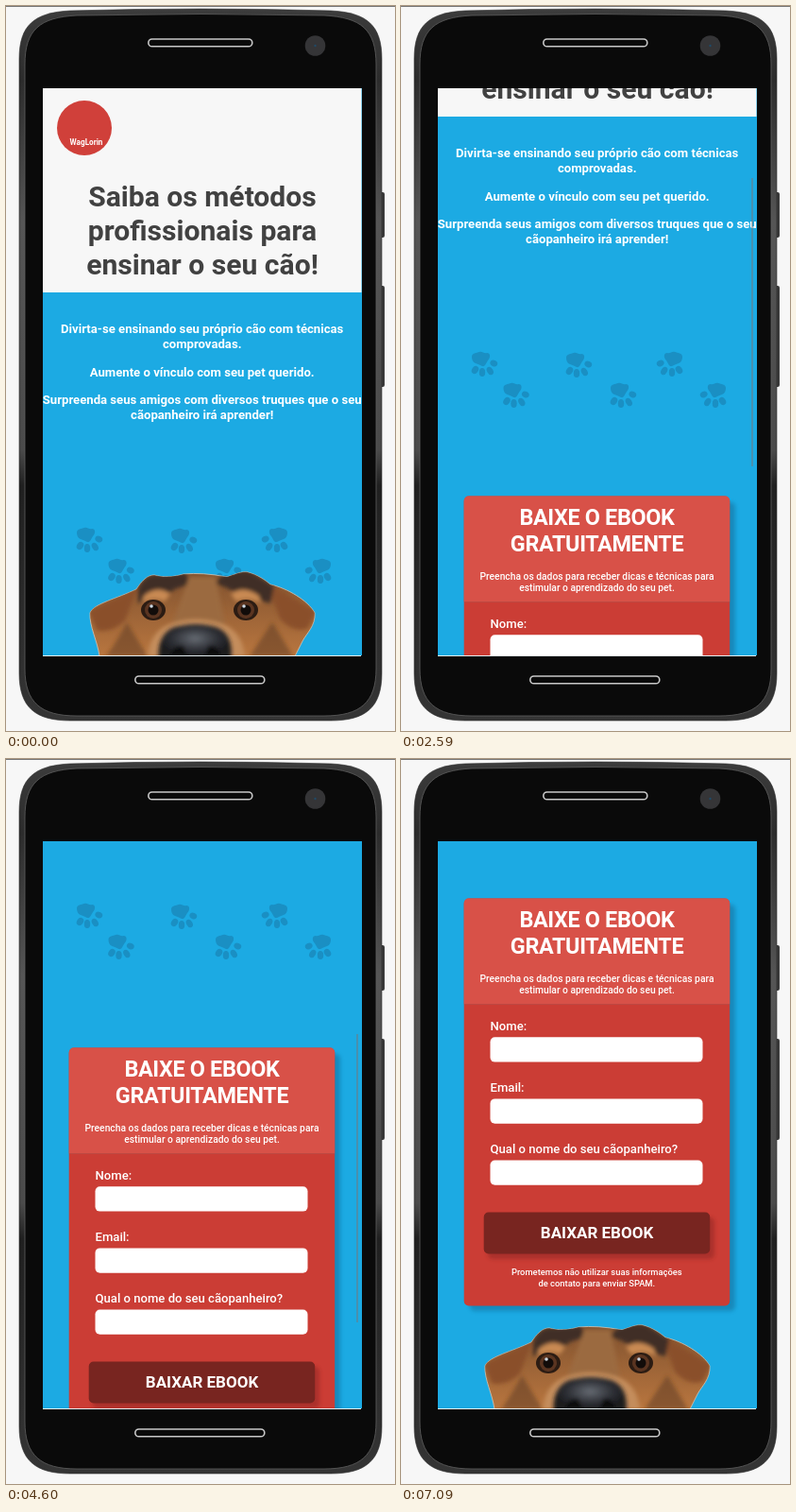
Animation, 412 px wide and 767 px high, one loop 8000 ms. Source, as an HTML page:

```html
<!DOCTYPE html>
<html lang="pt">
<head>
<meta charset="utf-8">
<title>Landing page</title>
<style>
html, body { margin: 0; width: 100%; height: 100%; overflow: hidden; background: #f7f7f7; }
svg { display: block; width: 100%; height: 100%; }
text { font-family: Roboto, Arial, sans-serif; fill: #fff; }
.mid text { text-anchor: middle; }
.title text { font-size: 30.1px; font-weight: 700; fill: #414141; }
.lead text { font-size: 13.15px; font-weight: 700; }
.head text { font-size: 23.4px; font-weight: 700; letter-spacing: -.35px; }
.intro text { font-size: 10.28px; font-weight: 500; }
.label text { font-size: 13.1px; font-weight: 500; }
.note text { font-size: 9.38px; font-weight: 500; }
</style>
</head>
<body>
<svg viewBox="0 0 412 767">
  <defs>
    <clipPath id="screen"><rect x="39" y="87" width="338" height="600"/></clipPath>
    <clipPath id="skull"><use href="#head"/></clipPath>
    <filter id="soft" x="-10%" y="-10%" width="120%" height="120%"><feGaussianBlur stdDeviation="2"/></filter>
    <linearGradient id="rim" x2="0" y2="1">
      <stop offset="0" stop-color="#3c3c3c"/><stop offset=".1" stop-color="#2c2c2c"/>
      <stop offset=".3" stop-color="#555"/><stop offset=".62" stop-color="#4a4a4a"/>
      <stop offset=".67" stop-color="#202020"/><stop offset="1" stop-color="#353535"/>
    </linearGradient>
    <linearGradient id="fur" x2="0" y2="1">
      <stop offset="0" stop-color="#80522f"/><stop offset="1" stop-color="#b9763f"/>
    </linearGradient>
    <radialGradient id="nose" cy=".4">
      <stop offset="0" stop-color="#666b73"/><stop offset=".6" stop-color="#303238"/>
      <stop offset="1" stop-color="#1a1a1d"/>
    </radialGradient>
    <path id="head" d="M99 688C97 672 88 656 89 642C93 632 118 627 138 617C144 608 150 602 157 602C167 605 178 604 188 601Q208 599 234 604C244 601 249 598 256 599C267 602 274 607 280 612C298 616 320 629 327 642C328 656 318 664 314 672L306 688Z"/>
    <g id="paw" fill="#1a8fc3">
      <path d="M-13-7C-13-11-8-11-5-12C-2-13 0-10 3-11C7-11 7-6 4-3C2 0 1 4-2 3C-4 2-6 1-9 0C-12-1-13-4-13-7Z"/>
      <ellipse cx="-9.5" cy="7" rx="3.3" ry="4.4" transform="rotate(35 -9.5 7)"/>
      <ellipse cx="-2" cy="9.5" rx="3.2" ry="4.5"/>
      <ellipse cx="6.3" cy="8" rx="3.2" ry="4.5" transform="rotate(-30 6.3 8)"/>
      <ellipse cx="10.3" cy="0" rx="4" ry="3.2" transform="rotate(25 10.3 0)"/>
    </g>
    <g id="eye">
      <ellipse rx="13" ry="11" fill="#2c1c13"/>
      <circle r="9" fill="#5b3521"/>
      <circle r="5.5" fill="#120c0a"/>
      <circle cx="-2" cy="-4" r="1.8" fill="#cdd8e2"/>
    </g>
  </defs>

  <rect width="412" height="767" fill="#f7f7f7"/>
  <path d="M0 .5H412" stroke="#777"/>

  <!-- phone -->
  <rect x="395" y="197" width="6" height="48" rx="2" fill="#3a3a3a"/>
  <rect x="395" y="296" width="6" height="107" rx="2" fill="#3a3a3a"/>
  <path fill="url(#rim)" stroke="#2a2a2a" stroke-width=".6" d="M14 56C14 20 30 7 68 5Q206 1 344 5C382 7 398 20 398 56V706C398 742 381 756 344 756H68C31 756 14 742 14 706Z"/>
  <path fill="#0a0a0a" stroke="#606060" stroke-width=".8" d="M20 62C20 25 36 12 75 10Q206 7 337 10C376 12 392 25 392 62V701C392 737 375 751 337 751H75C37 751 20 737 20 701Z"/>
  <g fill="#0a0a0a" stroke="#c8c8c8" stroke-width="1.6">
    <rect x="150.8" y="35" width="110" height="7.8" rx="3.9"/>
    <rect x="136.8" y="709" width="137" height="7.8" rx="3.9"/>
  </g>
  <circle cx="327.5" cy="42" r="10.8" fill="#353537"/>
  <circle cx="327.5" cy="42" r="1.2" fill="#204a68"/>
  <path d="M39 687.5H376" stroke="#e4eef2"/>

  <g clip-path="url(#screen)">
    <rect x="39" y="87" width="338" height="600" fill="#1caae3"/>

    <g class="scroll mid">
      <rect x="39" y="87" width="337.5" height="216" fill="#f7f7f7"/>
      <circle cx="83" cy="129" r="29" fill="#d0403a"/>
      <text x="85" y="146.5" font-size="8.2" font-weight="700">WagLorin</text>
      <g class="title">
        <text x="208" y="211.5">Saiba os métodos</text>
        <text x="208" y="247.5">profissionais para</text>
        <text x="208" y="283.5">ensinar o seu cão!</text>
      </g>
      <g class="lead">
        <text x="207.7" y="346">Divirta-se ensinando seu próprio cão com técnicas</text>
        <text x="207.7" y="362">comprovadas.</text>
        <text x="207.7" y="391.5">Aumente o vínculo com seu pet querido.</text>
        <text x="207.7" y="421">Surpreenda seus amigos com diversos truques que o seu</text>
        <text x="207.7" y="437">cãopanheiro irá aprender!</text>
      </g>
      <use href="#paw" x="88" y="564"/>
      <use href="#paw" x="121.5" y="597"/>
      <use href="#paw" x="188" y="565"/>
      <use href="#paw" x="235" y="597"/>
      <use href="#paw" transform="translate(285 564) scale(-1 1)"/>
      <use href="#paw" transform="translate(331 597) scale(-1 1)"/>
    </g>

    <!-- dog, fixed to the bottom edge -->
    <use href="#head" fill="url(#fur)" stroke="#d9c6b3" stroke-width=".8"/>
    <g clip-path="url(#skull)">
      <g filter="url(#soft)">
        <path fill="#8a4f2a" d="M88 640L139 616Q132 634 126 650Q112 664 96 660ZM328 640L274 609Q284 630 290 648Q304 664 320 658Z"/>
        <path fill="#3f2e25" d="M140 616Q148 600 160 602L190 600L198 612Q180 614 172 622L140 632ZM230 602Q246 596 260 599L284 614L280 632L244 622Q234 614 220 611Z"/>
        <path fill="#c98a52" d="M146 624Q160 612 174 622L168 630Q156 624 144 632ZM238 622Q252 612 268 624L270 632Q256 624 244 630Z"/>
        <path fill="#9b6a41" d="M194 604H222L232 654H176Z"/>
        <path fill="#5b3a27" d="M106 688Q120 668 128 652L150 688ZM304 688Q292 668 282 652L258 688Z" opacity=".5"/>
        <path fill="#c48d5c" d="M150 688Q153 660 176 653Q201 645 227 653Q250 660 253 688Z"/>
      </g>
      <use href="#eye" x="156" y="639"/>
      <use href="#eye" x="254" y="639"/>
      <g filter="url(#soft)">
        <path fill="url(#nose)" d="M162 692C160 672 168 658 184 656Q201 652 218 656C234 659 241 672 238 692Z"/>
        <path fill="#0c0c0e" d="M174 690Q176 675 188 677L193 690ZM210 690L214 677Q226 675 227 690Z"/>
      </g>
    </g>

    <g class="scroll">
      <rect x="73" y="711" width="281" height="430" rx="5" fill="#0a4f74" opacity=".36" filter="url(#soft)"/>
      <rect x="66.7" y="704.5" width="281.5" height="431" rx="5" fill="#cb3d35"/>
      <path fill="#d85148" d="M66.7 816.5V709.5a5 5 0 0 1 5-5H343.2a5 5 0 0 1 5 5V816.5Z"/>
      <path d="M67 816.5H348" stroke="#b94a43" stroke-width=".8"/>
      <g class="mid head">
        <text x="207.5" y="734.5">BAIXE O EBOOK</text>
        <text x="207.5" y="762.5">GRATUITAMENTE</text>
      </g>
      <g class="mid intro">
        <text x="207.5" y="793">Preencha os dados para receber dicas e técnicas para</text>
        <text x="207.5" y="805">estimular o aprendizado do seu pet.</text>
      </g>
      <g class="label">
        <text x="94.5" y="843.5">Nome:</text>
        <text x="94.5" y="908.5">Email:</text>
        <text x="94.5" y="973.5">Qual o nome do seu cãopanheiro?</text>
      </g>
      <g fill="#fff">
        <rect x="94.5" y="851.3" width="225" height="26.3" rx="5"/>
        <rect x="94.5" y="916.4" width="225" height="26.3" rx="5"/>
        <rect x="94.5" y="981.5" width="225" height="26.3" rx="5"/>
      </g>
      <rect x="92" y="1042" width="240" height="44" rx="5" fill="#7a1f1b" opacity=".4" filter="url(#soft)"/>
      <rect x="87.7" y="1036.5" width="239.5" height="44" rx="5" fill="#782520"/>
      <g class="mid">
        <text x="207.5" y="1064.3" font-size="17" font-weight="700">BAIXAR EBOOK</text>
      </g>
      <g class="mid note">
        <text x="207.3" y="1103">Prometemos não utilizar suas informações</text>
        <text x="207.3" y="1115">de contato para enviar SPAM.</text>
      </g>
    </g>

    <rect id="bar" x="371" y="87" width="2" height="305" fill="#77787a"/>
  </g>
</svg>
<script>
const LOOP = 8000;
const layers = document.querySelectorAll('.scroll');
const bar = document.getElementById('bar');

// Runs of screen updates: first, last, count; times sit on a 30 ms grid.
const runs = [[400, 1360, 8], [1510, 2440, 8], [2590, 3550, 8],
  [3670, 4600, 8], [4750, 5770, 8], [5890, 6520, 6]];
const snap = t => 400 + Math.round((t - 400) / 30) * 30;
const steps = runs.flatMap(([a, b, n]) =>
  Array.from({ length: n }, (_, i) => snap(a + (b - a) * i / (n - 1))));

// Scroll keys: time, offset
const keys = [[270, 0], [1630, 89], [2590, 186], [3280, 264],
  [4600, 399], [5620, 506], [6520, 557]];

function slope(i) {
  if (i === 0) return 0.02;
  if (i === keys.length - 1) return 0;
  const [a, b] = [keys[i - 1], keys[i + 1]];
  return (b[1] - a[1]) / (b[0] - a[0]);
}

// Cubic Hermite through the keys
function scrollAt(t) {
  let i = 0;
  while (i < keys.length - 2 && t >= keys[i + 1][0]) i++;
  const [t0, y0] = keys[i], [t1, y1] = keys[i + 1];
  const d = t1 - t0, u = (t - t0) / d, v = 1 - u;
  return y0 * v * v * (1 + 2 * u) + y1 * u * u * (3 - 2 * u)
    + d * u * v * (slope(i) * v - slope(i + 1) * u);
}

function draw(t) {
  const step = steps.filter(x => x <= t).pop();
  const y = step === undefined ? 0 : Math.round(scrollAt(step));
  layers.forEach(g => g.setAttribute('transform', `translate(0 ${-y})`));
  bar.setAttribute('y', 87 + Math.round(y * 0.512));
  bar.setAttribute('opacity', t < 400 || t >= 7090 ? 0 : t < 6940 ? 0.5 : 0.25);
}

const start = performance.now();
function tick() {
  draw((performance.now() - start) % LOOP);
  requestAnimationFrame(tick);
}
tick();
</script>
</body>
</html>
```
